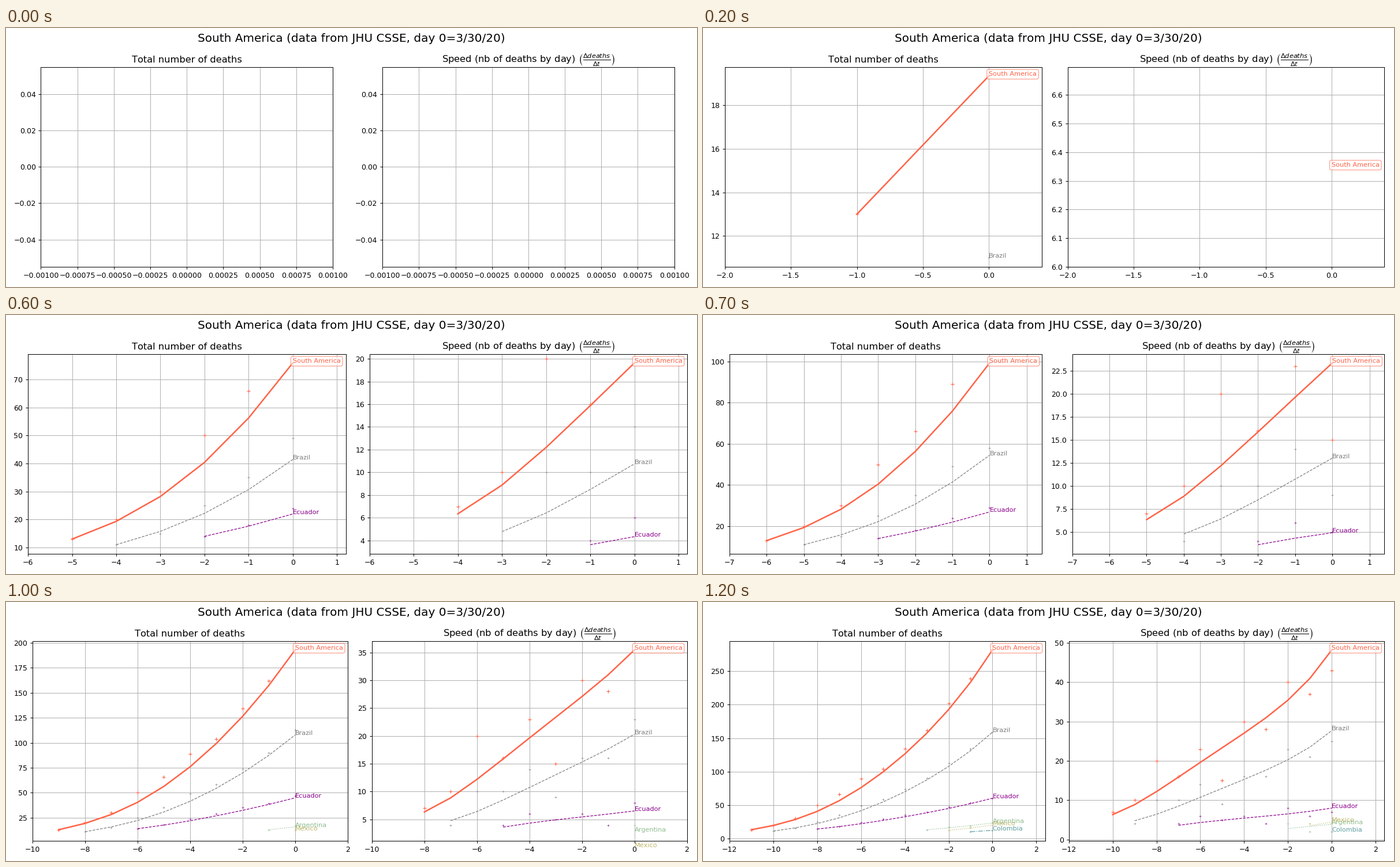
These frames come from a looping animation (1197 px wide and 450 px high, 4.2 s). A matplotlib script:

```python
import numpy as np
import matplotlib.pyplot as plt
from matplotlib.animation import FuncAnimation

W, H, DPI = 1197, 450, 90
TOP, BOTTOM = 67.56, 414.9
DAYS, STEP_MS, LOOP_MS = 12, 100, 4200
PAPER, GRID = "white", "#b0b0b0"
DIM_PAPER, DIM_GRID, DIM_INK = "#555555", "#222222", "#1a1a1a"

plt.rcParams.update({"font.family": "DejaVu Sans", "font.size": 10,
                     "text.kerning_factor": 6})

# name, colour, line style, first day, first total, evenly spaced speed keys
SERIES = [
    ("South America", "tomato", "-", 0, 13, (6.349, 14.01, 23.35, 33.12, 48.2)),
    ("Brazil", "gray", "--", 1, 11, (4.78, 9.05, 14.16, 19.6, 27.7)),
    ("Ecuador", "darkmagenta", "--", 3, 14, (3.63, 5.11, 6.335, 8)),
    ("Argentina", "darkseagreen", ":", 8, 13, (2.8, 3.9)),
    ("Mexico", "darkkhaki", ":", 9, 12, (3.55, 4.45)),
    ("Colombia", "cadetblue", "-.", 10, 10, (2,)),
]
TITLES = (
    "Total number of deaths",
    r"Speed (nb of deaths by day) "
    r"$\left(\frac{\Delta deaths}{\Delta t}\right)$",
)

fig = plt.figure(figsize=(W / DPI, H / DPI), dpi=DPI)


def model(first, start, keys):
    """Smooth speed and total, and the daily counts scattered around it."""
    steps = DAYS - 1 - first
    knots = np.linspace(0, steps - 1, len(keys))
    speed = np.polyval(np.polyfit(knots, keys, len(keys) - 1), np.arange(steps))
    level = start + np.concatenate(([0], np.cumsum(speed)))
    t = np.arange(steps + 1)
    u = np.pi * t / steps
    # counts run ahead of the curve mid-way, more so on odd days
    odd = np.where((t + first) % 2, 1.25, 0.75)
    lead = odd * np.sin(u) - 0.35 * np.sin(4 * u)
    total = np.round(level + 0.033 * level[-1] * lead)
    return total, level, np.diff(total), speed


MODELS = [model(*s[3:]) for s in SERIES]


def text_width(label):
    """Approximate width in pixels of a tick label."""
    return sum({".": 3.97, "\u2212": 10.47}.get(c, 7.95) for c in label)


def tick_labels(axis):
    lo, hi = axis.get_view_interval()
    ticks = [t for t in axis.get_majorticklocs() if lo - 1e-9 <= t <= hi + 1e-9]
    return ticks, axis.get_major_formatter().format_ticks(ticks)


def y_limits(values):
    if not values:
        return -0.055, 0.055
    lo, hi = min(values), max(values)
    pad = 0.055 * hi if lo == hi else 0.05 * (hi - lo)
    return lo - pad, hi + pad


def place(left_ax, right_ax):
    """Fit both panels side by side around their tick labels."""
    wl, wr = (max(map(text_width, tick_labels(ax.yaxis)[1]))
              for ax in (left_ax, right_ax))
    ticks, labels = tick_labels(left_ax.xaxis)
    over = 3.2
    if abs(ticks[-1] - left_ax.get_xlim()[1]) < 1e-9:
        over = max(over, text_width(labels[-1]) / 2)
    x0, gap, end = 22.15 + wl, 22.15 + wr + over, W - 13.5 - over
    width = (end - x0 - gap) / 2
    for ax, x in ((left_ax, x0), (right_ax, x0 + width + gap)):
        ax.set_position([x / W, (H - BOTTOM) / H, width / W, (BOTTOM - TOP) / H])


def draw_series(ax, day, first, raw, smooth, name, color, style):
    """Plot one series up to the given day; return the visible curve."""
    main = style == "-"
    count = max(0, day - first + 1)
    x = np.arange(count) + first - day
    curve = list(smooth[:count])
    ax.plot(x, raw[:count], "+", color=color, ms=5 if main else 2.5,
            mew=0.9 if main else 0.5)
    ax.plot(x, curve, style, color=color, lw=2 if main else 1)
    box = dict(boxstyle="round,pad=0.3", fc=ax.get_facecolor(), ec=color,
               alpha=0.6) if main else None
    ax.text(0, curve[-1] if curve else 0, name, color=color, size=9, bbox=box)
    return curve


def draw(frame):
    n = min(frame, DAYS)
    day, dim = n - 1, n == 1
    paper = DIM_PAPER if dim else PAPER
    fig.clear()
    fig.set_facecolor(paper)
    fig.suptitle("South America (data from JHU CSSE, day 0=3/30/20)", size=16)
    axes = [fig.add_subplot(1, 2, i + 1, facecolor=paper) for i in range(2)]
    for ax, title in zip(axes, TITLES):
        ax.set_title(title, size=13)
        ax.grid(True, color=DIM_GRID if dim else GRID)

    curves = [[], []]
    for (name, color, style, first, *_), data in zip(SERIES, MODELS):
        if day < first:
            continue
        total, level, rise, speed = data
        look = (name, DIM_INK if dim else color, style)
        curves[0] += draw_series(axes[0], day, first, total, level, *look)
        curves[1] += draw_series(axes[1], day, first + 1, rise, speed, *look)

    for ax, values in zip(axes, curves):
        ax.set_xlim(*((-n, n / 5) if n else (-0.001, 0.001)))
        ax.set_ylim(*y_limits(values))
    place(*axes)
    return []


anim = FuncAnimation(fig, draw, frames=LOOP_MS // STEP_MS, interval=STEP_MS,
                     init_func=lambda: [], repeat=True, repeat_delay=0)
plt.show()
```
